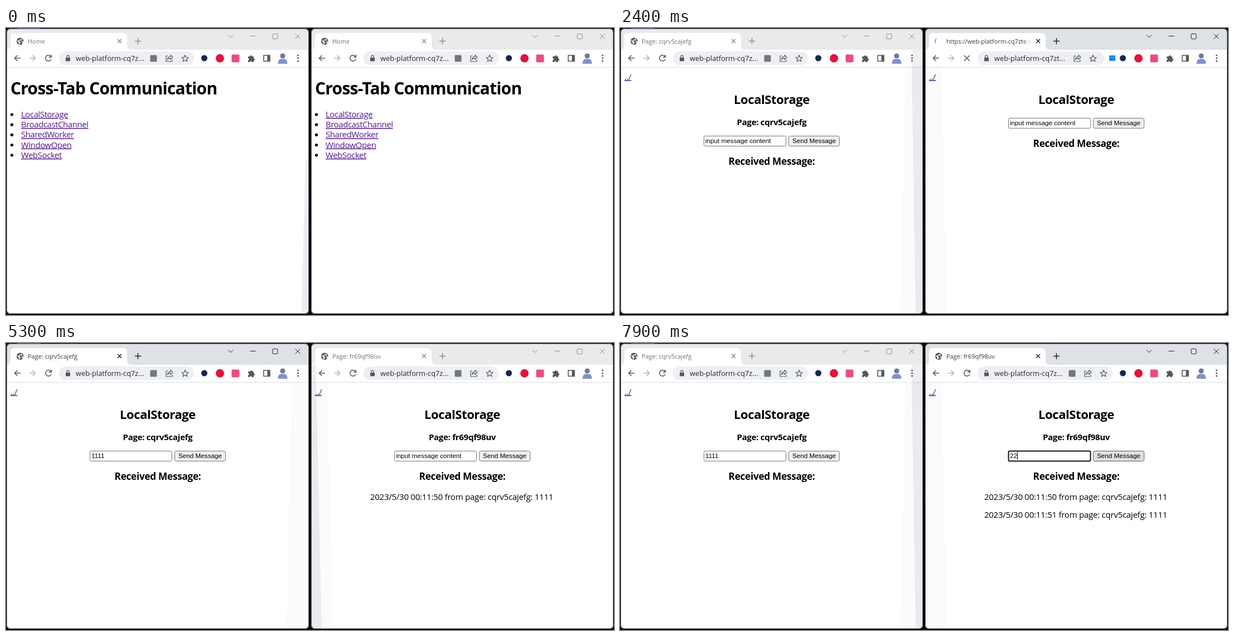
An HTML page that plays this animation: 1090x514 px, repeating every 8000 ms.

```html
<!DOCTYPE html>
<html lang="en">
<head>
<meta charset="utf-8">
<title>Cross-Tab Communication</title>
<style>
  html, body { margin: 0; width: 100%; height: 100%; overflow: hidden; background: #0b0b0e; }
  svg { display: block; width: 1090px; height: 514px; }
  text { font-family: "Open Sans", "Noto Sans", sans-serif; fill: #000; white-space: pre; }
  .h1 { font-size: 30px; font-weight: 700; letter-spacing: -.77px; }
  .h2 { font-size: 22px; font-weight: 700; letter-spacing: -.43px; }
  .h3 { font-size: 17.3px; font-weight: 700; letter-spacing: -.33px; }
  .h4 { font-size: 15px; font-weight: 700; letter-spacing: -.27px; }
  .body { font-size: 15px; letter-spacing: -.25px; }
  .link { font-size: 15px; letter-spacing: -.45px; fill: #551a8b; text-decoration: underline; }
  .mid { text-anchor: middle; }
  .tab { font-size: 11px; }
  .url { font-size: 12.8px; fill: #25282c; }
  .tip { font-size: 10.7px; fill: #4a4d52; }
  .ui { font-family: "Liberation Sans", Arial, sans-serif; font-size: 11.7px; }
  .ico { fill: none; stroke: #54585d; stroke-width: 1.6; }
  .thin { stroke-width: 1.2; }
  .fill { fill: #54585d; }
  .shade { mix-blend-mode: multiply; }
</style>
</head>
<body>
<svg id="stage" viewBox="0 0 1090 514" xmlns="http://www.w3.org/2000/svg"></svg>
<script>
const LOOP = 8000;
const stage = document.getElementById('stage');
const LINKS = ['LocalStorage', 'BroadcastChannel', 'SharedWorker', 'WindowOpen', 'WebSocket'];
const HINT = 'input message content';
const LONG_TITLE = 'https://web-platform-cq7zte.s';

// Step tables: [time, value]
const WINDOWS = [
  {
    dx: 0, name: 'cqrv5cajefg', messages: [],
    focus: [[0, 0], [100, 0], [400, 1], [1900, 1], [2100, 0], [2800, 0], [3100, 1], [7300, 1], [7600, 0]],
    page: [[0, 'home'], [1700, 'partial'], [1900, 'full']],
    load: [[0, 0], [1500, 1], [1900, 0]],
    tip: [[0, 0], [500, 1], [1700, 0]],
    input: [[0, HINT], [3300, '1'], [3500, '11'], [3700, '111'], [3900, '1111']],
    ring: [[0, ''], [3100, 'focus'], [5000, '']],
    select: [[0, 0], [3200, 1], [3300, 0]],
    caret: [[0, 0], [3300, 1], [4000, 0], [4500, 1], [5000, 0]],
    button: [[0, 'idle'], [4000, 'hover'], [5000, 'press'], [5300, 'idle'], [5400, 'hover'], [6400, 'press'], [6600, 'idle']]
  },
  {
    dx: 546, name: 'fr69qf98uv',
    messages: [[5000, '50'], [6400, '51']],
    focus: [[0, 0], [1900, 0], [2100, 1], [2800, 1], [3100, 0], [7300, 0], [7600, 1]],
    page: [[0, 'home'], [2400, 'partial'], [2600, 'full']],
    load: [[0, 0], [2300, 1], [2600, 0]],
    tip: [[0, 0]],
    input: [[0, HINT], [7600, '2'], [7800, '22']],
    ring: [[0, ''], [6900, 'hover'], [7300, 'focus']],
    select: [[0, 0], [7400, 1], [7600, 0]],
    caret: [[0, 0], [7600, 1]],
    button: [[0, 'idle'], [7900, 'hover']]
  }
];
const BUTTON = {
  idle: ['#efefef', '#767676'],
  hover: ['#dfe0e2', '#585858'],
  press: ['#e2e2e2', '#4c4c4c']
};

function step(table, t) {
  let value = table[0][1];
  for (const [time, v] of table) if (t >= time) value = v;
  return value;
}

function ramp(table, t) {
  for (let i = 1; i < table.length; i++) {
    const [t0, a] = table[i - 1], [t1, b] = table[i];
    if (t < t1) return a + (b - a) * (t - t0) / (t1 - t0);
  }
  return table[table.length - 1][1];
}

function mix(a, b, k) {
  return `rgb(${a.map((v, i) => Math.round(v + (b[i] - v) * k))})`;
}

const text = (cls, x, y, s, id = '') => `<text class="${cls}" data-id="${id}" x="${x}" y="${y}">${s}</text>`;
const icon = (d, cls = '', extra = '') => `<path class="ico ${cls}" d="${d}" ${extra}/>`;

function titleBar() {
  return `<rect data-id="bar" x="1" y="1" width="542" height="38"/>
    <path d="M0 39Q8 39 8 31V17Q8 9 16 9H209Q217 9 217 17V31Q217 39 225 39Z" fill="#fff"/>
    <g data-id="globe"><circle class="fill" cx="25.3" cy="23.7" r="6.3"/>
      <path d="M20.3 22.5l3.2 3v3l2-2.5-2.7-2.5 2-2h3.5l-1-2.3M28 24.5l3 .5-2 3" fill="none" stroke="#fff" stroke-width="1.3"/></g>
    <circle data-id="spin" cx="25.3" cy="23.7" r="6.2" fill="none" stroke="#5b9df0" stroke-width="1.7" stroke-dasharray="9 40"/>
    ${text('tab', 39, 28, 'Home', 'title')}
    <rect x="176" y="14" width="17" height="20" fill="url(#fade)"/>
    <g data-id="controls" fill="none">
      <path d="M200 20l7 7m0-7l-7 7M231 23.5h11M236.5 18v11" stroke-width="1.5"/>
      <path d="M398 12.5l4.5 4.5 4.5-4.5M437.5 14.5h10M518.5 10.5l9 9m0-9l-9 9"/>
      <rect x="478" y="10.5" width="9" height="9" rx="1.5"/></g>`;
}

function toolBar() {
  return `<rect x="1" y="39" width="542" height="31" fill="#fff"/>
    <rect x="1" y="70" width="542" height="1" fill="#dcdee1"/>
    ${icon('M26 54H15.5m5-5l-5 5 5 5')}
    ${icon('M42 54h10.5m-5-5l5 5-5 5', '', 'opacity=".45"')}
    <g data-id="reload">${icon('M80.5 51A5.3 5.3 0 1 0 81 56M81.3 48v4.2h-4.4')}</g>
    <g data-id="stop">${icon('M71 49l10 10m0-10l-10 10')}</g>
    <rect data-id="pill" x="95" y="42" width="242" height="24.5" rx="12.2" fill="#edeff4"/>
    <rect class="fill" x="107" y="53" width="8" height="6.5" rx="1"/>
    ${icon('M108.8 53v-1.6a2.2 2.2 0 0 1 4.4 0V53', 'thin')}
    ${text('url', 125, 59, '', 'url')}
    <rect data-id="badge" x="258.5" y="48.5" width="12" height="12" rx="1.5" fill="#74787d"/>
    <g data-id="actions" stroke-linejoin="round">
      ${icon('M290 50h-3v10h11v-3M289.5 56.5q.5-5 5.5-5.3v-2.9l4 4.2-4 4.2v-2.5q-4 0-5.5 2.3z', 'thin')}
      ${icon('M321 48.5l1.7 4 4.3.4-3.3 2.8 1 4.2-3.7-2.3-3.7 2.3 1-4.2-3.3-2.8 4.3-.4z', 'thin')}</g>
    <rect data-id="extra" x="331" y="49" width="11" height="10" fill="#2388f5"/>
    <circle cx="355.5" cy="54" r="5.5" fill="#152653"/>
    <circle cx="383.5" cy="54.3" r="7.5" fill="#e2133a"/>
    <rect x="404.5" y="47.5" width="14" height="14" rx="2" fill="#ea4c87"/>
    <path class="fill" d="M434 51h3.5a2 2 0 1 1 4 0H444v3.5a2 2 0 1 1 0 4V61h-3.5a1.8 1.8 0 0 0-3.6 0H434v-3.5a1.8 1.8 0 0 0 0-3.6z"/>
    ${icon('M462 49h11v10.5h-11z')}<rect class="fill" x="468.5" y="49" width="4.5" height="10"/>
    <circle cx="496" cy="50" r="4.6" fill="#73759b"/>
    <path d="M487.5 64q0-8 5.5-8.5h6q5.5.5 5.5 8.5z" fill="#7f91c8"/>
    <g class="fill"><circle cx="523.5" cy="49" r="1.5"/><circle cx="523.5" cy="54" r="1.5"/><circle cx="523.5" cy="59" r="1.5"/></g>`;
}

function homePage() {
  return `<g data-id="home">${text('h1', 8, 119, 'Cross-Tab Communication')}` +
    LINKS.map((s, i) => `<circle cx="10.5" cy="${155 + i * 18.2}" r="2.6"/>` +
      text('link', 27, 160 + i * 18.2, s)).join('') + '</g>';
}

function localPage(win) {
  return `<g data-id="local">
    ${text('link', 8, 92.5, '../')}
    ${text('h2 mid', 272, 136, 'LocalStorage')}
    ${text('h4 mid', 272, 174, 'Page: ' + win.name, 'name')}
    <g data-id="form">
      <rect data-id="box" x="150.5" y="193.5" width="147" height="18" rx="2" fill="#fff"/>
      <rect data-id="mark" x="153" y="195" width="118" height="14.5" fill="#3390ff"/>
      ${text('ui', 153, 206, HINT, 'input')}
      <rect data-id="caret" y="195" width="1" height="14"/>
      <rect data-id="button" x="302.5" y="193.5" width="91" height="18" rx="3"/>
      ${text('ui mid', 348, 206, 'Send Message')}
      ${text('h3 mid', 272, 245, 'Received Message:')}</g>
    ${win.messages.map(([, sec], i) => text('body mid', 271, 281 + i * 32.3,
      `2023/5/30 00:11:${sec} from page: cqrv5cajefg: 1111`, 'msg' + i)).join('')}</g>`;
}

// Soft strips along the side that faces the other window
function edge(win) {
  const shape = win.dx ? 'M1 39H10V70L20 512H1Z' : 'M523 39H543V512H530L523 70Z';
  const glow = win.dx ? 'M1 71H30L40 512H1Z' : 'M543 71H512L503 512H543Z';
  return `<path data-id="glow" d="${glow}" fill="#fbfbfc"/>
    <path data-id="edge" class="shade" d="${shape}" fill="#eeeff1"/>
    ${win.dx ? '' : '<path data-id="sliver" d="M537 235H543V512H529.5Z" fill="#eceef5"/>'}`;
}

function build(win) {
  const g = document.createElementNS(stage.namespaceURI, 'g');
  g.setAttribute('transform', `translate(${win.dx} 0)`);
  g.setAttribute('clip-path', 'url(#frame)');
  g.innerHTML = `<rect x="1" y="1" width="542" height="511" fill="#fff"/>
    ${titleBar()}${toolBar()}${edge(win)}${homePage()}${localPage(win)}
    <g data-id="tip"><path d="M1 492H176Q180 492 180 496V512H1Z" fill="#dee1e6"/>
      ${text('tip', 5, 506.5, '...stackblitz.io/.../LocalStorage.h...')}</g>
    <rect x="1.5" y="1.5" width="541" height="510" rx="7" fill="none" stroke="#6c6d70"/>`;
  stage.append(g);
  win.el = {};
  g.querySelectorAll('[data-id]').forEach(e => { win.el[e.dataset.id] = e; });
}

function backdrop() {
  let seed = 7, specks = '';
  const rand = () => (seed = seed * 16807 % 2147483647) / 2147483647;
  for (let i = 0; i < 45; i++) {
    specks += `<rect x="${(543 + rand() * 4).toFixed(1)}" y="${(rand() * 514).toFixed(1)}" width="1" height="1" fill="#34353c"/>`;
  }
  stage.innerHTML = `<defs>
      <clipPath id="frame"><rect x="1" y="1" width="542" height="511" rx="7"/></clipPath>
      <linearGradient id="fade"><stop stop-color="#fff" stop-opacity="0"/><stop offset="1" stop-color="#fff"/></linearGradient>
    </defs>
    <rect width="1090" height="514" fill="#0b0b0e"/>${specks}
    <rect x="20" width="42" height="1" fill="#4b579c"/>`;
}

const show = (e, on) => e.setAttribute('visibility', on ? 'inherit' : 'hidden');
const put = (e, s) => { if (e.textContent !== s) e.textContent = s; };
const set = (e, attrs) => { for (const k in attrs) e.setAttribute(k, attrs[k]); };

function draw(win, other, t) {
  const el = win.el;
  const focus = ramp(win.focus, t), rival = ramp(other.focus, t);
  const page = step(win.page, t), loading = step(win.load, t);
  const partial = page === 'partial';

  set(el.bar, { fill: mix([233, 235, 234], [222, 225, 230], focus) });
  set(el.controls, { stroke: mix([138, 140, 142], [32, 33, 36], focus) });
  el.title.style.fill = mix([112, 114, 117], [55, 58, 62], focus);
  set(el.edge, { opacity: rival * (1 - focus) });
  set(el.glow, { opacity: Math.max(focus, rival) });
  if (el.sliver) set(el.sliver, { opacity: 1 - Math.max(focus, rival) });

  put(el.title, page === 'home' ? 'Home' : partial ? LONG_TITLE : 'Page: ' + win.name);
  show(el.globe, !loading);
  show(el.spin, loading && partial);
  set(el.spin, { transform: `rotate(${t * .36} 25.3 23.7)` });
  show(el.reload, !loading);
  show(el.stop, loading);

  put(el.url, partial ? 'web-platform-cq7zt...' : 'web-platform-cq7z...');
  set(el.pill, { width: partial ? 227 : 242 });
  set(el.actions, { transform: `translate(${partial ? -19 : 0} 0)` });
  show(el.badge, !partial);
  show(el.extra, partial);

  show(el.home, page === 'home');
  show(el.local, page !== 'home');
  show(el.name, page === 'full');
  set(el.form, { transform: `translate(0 ${partial ? -32 : 0})` });
  show(el.tip, step(win.tip, t));

  const ring = step(win.ring, t), selected = step(win.select, t);
  set(el.box, {
    stroke: ring === 'focus' ? '#101010' : ring ? '#444' : '#767676',
    'stroke-width': ring === 'focus' ? 2 : 1
  });
  show(el.mark, selected);
  put(el.input, step(win.input, t));
  el.input.style.fill = selected ? '#fff' : '#000';
  const caret = step(win.caret, t);
  show(el.caret, caret);
  if (caret) set(el.caret, { x: Math.round(153 + el.input.getComputedTextLength()) });
  const [fill, stroke] = BUTTON[step(win.button, t)];
  set(el.button, { fill, stroke });
  win.messages.forEach(([time], i) => show(el['msg' + i], t >= time));
}

function tick(now) {
  const t = Math.floor(now % LOOP / 100) * 100;
  const [a, b] = WINDOWS;
  draw(a, b, t);
  draw(b, a, t);
  requestAnimationFrame(tick);
}

backdrop();
WINDOWS.forEach(build);
tick(0);
</script>
</body>
</html>
```
